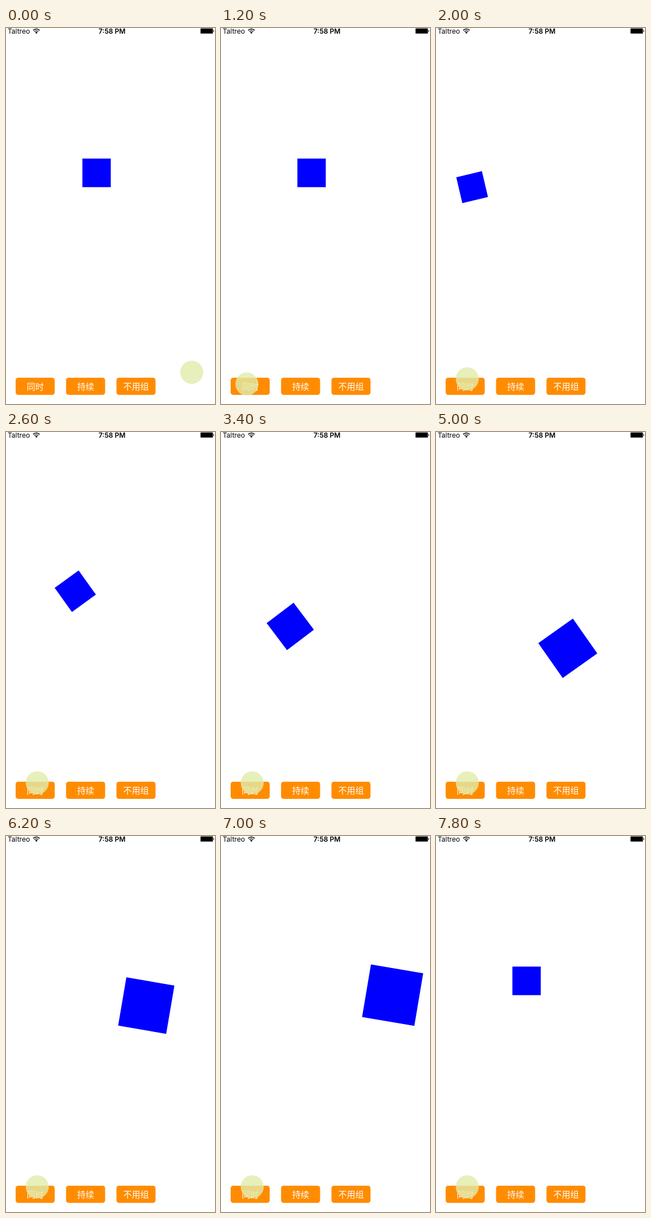
Animation, 368 px wide and 658 px high, one loop 8 s. Source, as an HTML page:

```html
<!DOCTYPE html>
<html lang="zh-CN">
<head>
<meta charset="utf-8">
<title>Animation group</title>
<style>
  html, body { margin: 0; width: 100%; height: 100%; overflow: hidden; background: #fff; }
  svg { display: block; width: 100%; height: 100%; }
  text { text-anchor: middle; }
  .status { font: 12px Inter, Roboto, sans-serif; }
  .label { font: 15px "Noto Sans CJK SC", "Noto Sans CJK", sans-serif; fill: #fff; }
  .wifi { fill: none; stroke: #000; stroke-width: 1.5; }
</style>
</head>
<body>
<svg viewBox="0 0 368 658">
  <g class="status">
    <text x="3" y="10" style="text-anchor: start">Taltreo</text>
    <text x="186.7" y="10" font-weight="600">7:58 PM</text>
  </g>
  <g class="wifi">
    <path d="M47.8 4.1A8.2 8.2 0 0 1 59.2 4.1"/>
    <path d="M50 6.3A5.1 5.1 0 0 1 57 6.3"/>
    <path d="M53.5 10L51.4 7.9A3 3 0 0 1 55.6 7.9Z" fill="#000" stroke="none"/>
  </g>
  <rect x="342.5" y=".8" width="21.8" height="9" rx="1" fill="#000" stroke="#888" stroke-width=".5"/>
  <path d="M365.2 3.6a1.8 1.8 0 0 1 0 3.4z"/>
  <g id="buttons"></g>
  <rect id="box" x="-25" y="-25" width="50" height="50" fill="#00f"/>
  <circle id="pointer" r="20.2" fill="#e2ecab" fill-opacity=".8"/>
</svg>
<script>
const LOOP = 8000, STEP = 200;
const box = document.getElementById('box');
const pointer = document.getElementById('pointer');

document.getElementById('buttons').innerHTML = ['同时', '持续', '不用组'].map((label, i) => {
  const x = 17 + i * 88.75;
  return `<rect x="${x}" y="612" width="68.75" height="30" rx="4.5" fill="#ff8c00"/>
    <text class="label" x="${x + 34.4}" y="632.5">${label}</text>`;
}).join('');

// Group animation: [time, progress] pairs and the corners of the path
const PROGRESS = [[1400, .0128], [2600, .2003], [3400, .3235], [5000, .5761], [6200, .7635], [7600, .982]];
const PATH = [[-3, 278.5], [122, 278.5], [122, 378.5], [247, 378.5], [247, 278.5], [372, 278.5]];

const mix = (a, b, k) => a + (b - a) * k;
const ease = (t, start, end) => {
  const k = Math.min(1, Math.max(0, (t - start) / (end - start)));
  return k * k * (3 - 2 * k);
};

function progressAt(t) {
  const i = Math.max(1, PROGRESS.findIndex(([time]) => time >= t));
  const [t0, p0] = PROGRESS[i - 1], [t1, p1] = PROGRESS[i];
  return mix(p0, p1, (t - t0) / (t1 - t0));
}

function boxTransform(t) {
  if (t < 1400 || t > 7600) return 'translate(159.5 253.5)';
  const p = progressAt(t);
  const i = Math.floor(p * 5), k = p * 5 - i;
  const [x, y] = PATH[i].map((v, axis) => mix(v, PATH[i + 1][axis], k));
  return `translate(${x} ${y}) rotate(${p * 720}) scale(${mix(.8, 2, p)})`;
}

function pointerPosition(t) {
  const travel = ease(t, 0, 1200), settle = ease(t, 1200, 1800);
  const dip = 57.7 * travel * (1 - travel);
  return [
    mix(327, 45.5, travel) + 9.5 * settle,
    mix(602.5, 623, travel) + dip - 9 * settle
  ];
}

function draw() {
  const t = Math.floor(performance.now() % LOOP / STEP) * STEP;
  const [x, y] = pointerPosition(t);
  box.setAttribute('transform', boxTransform(t));
  pointer.setAttribute('cx', x);
  pointer.setAttribute('cy', y);
  requestAnimationFrame(draw);
}
draw();
</script>
</body>
</html>
```
